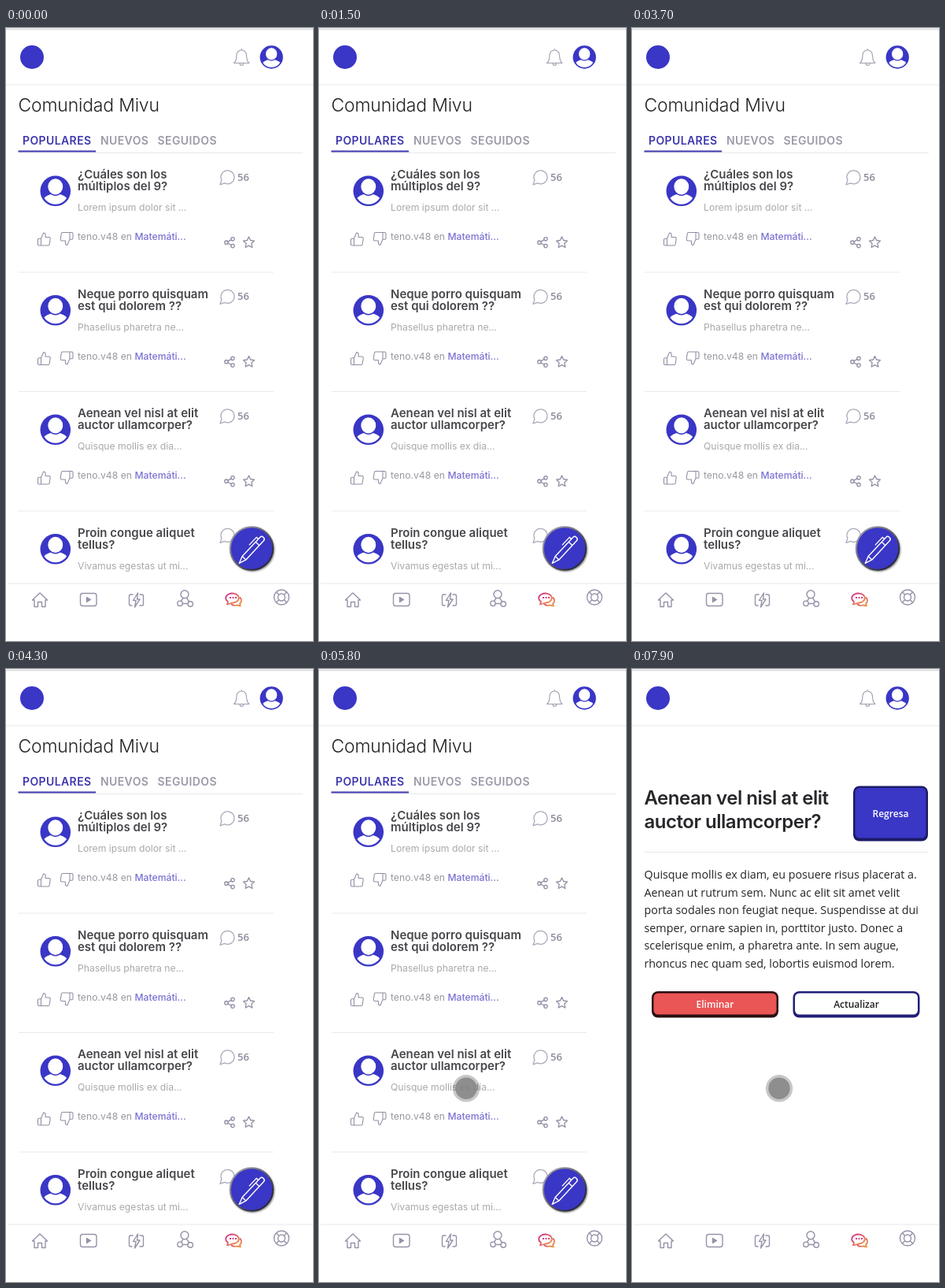
Recreate the animation shown at these times as an HTML page. Size 390 by 778 pixels, loop 8000 ms.

```html
<!DOCTYPE html>
<html lang="es">
<head>
<meta charset="utf-8">
<title>Comunidad</title>
<style>
  html, body { margin: 0; width: 100%; height: 100%; overflow: hidden; background: #fff; }
  svg.stage { display: block; width: 100vw; height: 100vh; }
  text { font-family: Inter, sans-serif; white-space: pre; }

  .heading { font-size: 23px; font-weight: 300; letter-spacing: -.2px; fill: #222; }
  .tab { font-size: 14px; font-weight: 600; letter-spacing: .4px; fill: #9b99a8; }
  .tab.active { fill: #3d37ad; }
  .question { font-size: 15px; font-weight: 600; fill: #48464b; }
  .excerpt, .meta { font-size: 12.2px; fill: #a9a9ad; }
  .meta { fill: #99979f; }
  .subject { font-weight: 500; fill: #7a72d2; }
  .count { font: 600 13px "Open Sans", sans-serif; fill: #8a8999; }
  .title { font-size: 24px; font-weight: 600; letter-spacing: -.02em; fill: #27272b; }
  .body { font: 14.3px "Open Sans", sans-serif; fill: #242428; }
  .label { font: 600 12px "Open Sans", sans-serif; text-anchor: middle; }

  .icon { fill: none; stroke: #8f8da3; stroke-width: 1.3; stroke-linecap: round; stroke-linejoin: round; }
  .icon.nav { stroke: #9593a9; stroke-width: 1.4; }
  .icon.bell { stroke: #a19fb0; stroke-width: 1.1; }
  .rule { stroke: #e9e9eb; stroke-width: 1.2; }

  #list { animation: leave 8s step-end infinite; }
  #detail { animation: enter 8s step-end infinite; }
  #touch { animation: press 8s step-end infinite; }
  @keyframes leave { 0% { visibility: visible; } 96.25%, 100% { visibility: hidden; } }
  @keyframes enter { 0% { visibility: hidden; } 96.25%, 100% { visibility: visible; } }
  @keyframes press { 0% { visibility: hidden; } 72.5%, 100% { visibility: visible; } }
</style>
</head>
<body>
<svg class="stage" viewBox="0 0 390 778">
  <defs>
    <clipPath id="face"><circle r="17"/></clipPath>
    <g id="avatar">
      <circle r="19.3" fill="#3a36c6"/>
      <g clip-path="url(#face)" fill="#fff">
        <ellipse cy="16.5" rx="17.5" ry="13"/>
        <ellipse cy="-5.4" rx="10.2" ry="10.8" stroke="#3a36c6" stroke-width="1.5"/>
      </g>
    </g>
    <path id="thumb" d="M2 -3V-7a3 3 0 0 0-3-3l-4 9v11H6.3a2 2 0 0 0 2-1.7l1.4-9a2 2 0 0 0-2-2.3zM-5 10h-3a2 2 0 0 1-2-2v-7a2 2 0 0 1 2-2h3"/>
    <path id="bubble" d="M9 -.5a8.4 8.4 0 0 1-12.3 7.6L-9 9l1.9-5.7A8.5 8.5 0 0 1 .5-9H1a8.5 8.5 0 0 1 8 8z"/>
    <g id="share">
      <circle cx="4" cy="-4.4" r="2.2"/><circle cx="-4" r="2.2"/><circle cx="4" cy="4.4" r="2.2"/>
      <path d="M-2 -1.1 2-3.3M-2 1.1 2 3.3"/>
    </g>
    <path id="star" d="M0 -7 2.1-2.5 7-1.9 3.4 1.5 4.3 6.5 0 4.1-4.3 6.5-3.4 1.5-7-1.9-2.1-2.5z"/>
    <linearGradient id="rim" x1="0" y1="0" x2="1" y2="1">
      <stop offset=".2" stop-color="#92929c"/><stop offset=".8" stop-color="#2c2c3c"/>
    </linearGradient>
    <linearGradient id="warm" x1="0" y1="0" x2="1" y2="1">
      <stop offset=".2" stop-color="#d43f80"/><stop offset="1" stop-color="#f2a33c"/>
    </linearGradient>
    <filter id="soft" x="-30%" y="-30%" width="160%" height="160%"><feGaussianBlur stdDeviation="1.2"/></filter>
  </defs>

  <rect width="390" height="778" fill="#fff"/>

  <g id="list">
    <text class="heading" x="15.5" y="106">Comunidad Mivu</text>
    <text class="tab active" x="21" y="148">POPULARES</text>
    <text class="tab" x="120" y="148">NUEVOS</text>
    <text class="tab" x="192.5" y="148">SEGUIDOS</text>
    <path class="rule" d="M16 158.5H377"/>
    <path d="M15.5 156.5H114" stroke="#3d37ad" stroke-width="2"/>
    <g id="posts"></g>
    <g transform="translate(312 660.5)">
      <circle cx="1.2" cy="1.5" r="28" fill="#000" opacity=".5" filter="url(#soft)"/>
      <circle r="27.2" fill="#3a36c6" stroke="url(#rim)" stroke-width="2"/>
      <g transform="translate(0 2) rotate(43)" fill="none" stroke="#fff" stroke-width="1.4" stroke-linejoin="round" stroke-linecap="round">
        <path d="M-3.2 -19a3.2 3 0 0 1 6.400 0V14L0 23-3.200 14zM-3.200 -11H3.200M-3.200 14H3.200M-3.200 -16H-6.500V-3"/>
      </g>
    </g>
  </g>

  <g id="detail">
    <text class="title" x="15.5" y="172">Aenean vel nisl at elit</text>
    <text class="title" x="15.5" y="202">auctor ullamcorper?</text>
    <path class="rule" d="M16 232.5H376"/>
    <g id="paragraph"></g>
    <g id="buttons"></g>
  </g>

  <path d="M0 1.5H390" stroke="#dedee0" stroke-width="2"/>
  <path class="rule" d="M0 72H390"/>
  <circle cx="33" cy="37" r="15" fill="#3a36c6"/>
  <path class="icon bell" d="M289.5 44.500C293 42 292.500 38 293 34.500a6.200 6.500 0 0 1 12.400 0C306 38 305.500 42 309 44.500zM297 45a2.300 2.300 0 0 0 4.600 0M299.200 28V26.500"/>
  <use href="#avatar" transform="translate(337.2 37) scale(.76)"/>

  <rect y="705" width="390" height="73" fill="#fff"/>
  <path class="rule" d="M2 705H390"/>
  <g class="icon nav">
    <path d="M33.5 726 43 717 52.5 726H50V734.5H45.5V728.5H40.5V734.5H36V726z"/>
    <rect x="94.5" y="717.5" width="20.5" height="16" rx="3"/>
    <path d="M102.5 722.5V728.5L107.5 725.5z" fill="#9593a9"/>
    <path d="M161 719H158.500Q156.500 719 156.500 721V731Q156.500 733 158.500 733H160M170 719H172.500Q174.500 719 174.500 721V731Q174.500 733 172.500 733H170M167.500 717 161.500 726.500H165L163.500 735 170 725H166.500z"/>
    <circle cx="227" cy="718.8" r="5"/><circle cx="221" cy="730.3" r="3.2"/><circle cx="234.200" cy="731" r="3.2"/>
    <path d="M225 723.5 222.500 727.300M229.500 723.300 232.500 728M224.300 730.500H230.800"/>
    <circle cx="350" cy="722.5" r="9.5"/><circle cx="350" cy="722.5" r="4.5"/>
    <path d="M343.500 716 346.700 719.200M356.500 716 353.300 719.200M343.500 729 346.700 725.800M356.500 729 353.300 725.800"/>
  </g>
  <g fill="none" stroke="url(#warm)" stroke-width="1.8" stroke-linejoin="round">
    <path d="M282 728A8.300 6 0 1 1 288 729.500L281 731.500z"/>
    <path d="M297 722.500C300 725 299.500 729 297 730.500L298 733.500 293.500 732.500C290 733.500 287.500 732.500 286 731"/>
    <path d="M284 723H293" stroke="#d43f80" stroke-width="2" stroke-dasharray="2 1.5"/>
  </g>

  <g id="touch" transform="translate(187 532.3)">
    <circle r="17.2" fill="#000" opacity=".22"/>
    <circle r="13.7" fill="#858585" opacity=".86"/>
  </g>
</svg>

<script>
  const put = (id, markup) => { document.getElementById(id).innerHTML = markup; };
  const icon = (name, x, y, extra = "") =>
    `<use href="#${name}" class="icon" transform="translate(${x} ${y}) ${extra}"/>`;

  const posts = [
    ["¿Cuáles son los", "múltiplos del 9?", "Lorem ipsum dolor sit ..."],
    ["Neque porro quisquam", "est qui dolorem ??", "Phasellus pharetra ne..."],
    ["Aenean vel nisl at elit", "auctor ullamcorper?", "Quisque mollis ex dia..."],
    ["Proin congue aliquet", "tellus?", "Vivamus egestas ut mi..."]
  ];

  put("posts", posts.map(([first, second, excerpt], i) => `
    <g transform="translate(0 ${i * 151.5})">
      <use href="#avatar" x="62.8" y="206.8"/>
      <text class="question" x="91" y="191">${first}</text>
      <text class="question" x="91" y="206">${second}</text>
      <text class="excerpt" x="91" y="232">${excerpt}</text>
      <text class="meta" x="91" y="269">teno.v48 en <tspan class="subject">Matemáti...</tspan></text>
      <text class="count" x="294" y="193.8">56</text>
      <g opacity=".75">${icon("bubble", 281, 189.8)}</g>
      ${icon("thumb", 48.5, 268, "scale(.8)")}
      ${icon("thumb", 77, 267.5, "rotate(180) scale(.8)")}
      ${icon("share", 284, 272.2)}
      ${icon("star", 308.5, 272)}
      <path class="rule" d="M16 310H340"/>
    </g>`).join(""));

  const lines = [
    "Quisque mollis ex diam, eu posuere risus placerat a.",
    "Aenean ut rutrum sem. Nunc ac elit sit amet velit",
    "porta sodales non feugiat neque. Suspendisse at dui",
    "semper, ornare sapien in, porttitor justo. Donec a",
    "scelerisque enim, a pharetra ante. In sem augue,",
    "rhoncus nec quam sed, lobortis euismod lorem."
  ];
  put("paragraph", lines.map((line, i) =>
    `<text class="body" x="15.5" y="${266 + i * 22.6}">${line}</text>`).join(""));

  const button = (label, x, y, w, h, fill, edge, ink) => `
    <rect x="${x}" y="${y}" width="${w}" height="${h}" rx="8" fill="${edge}"/>
    <rect x="${x + 2.5}" y="${y + 2.5}" width="${w - 5}" height="${h - 6.5}" rx="5.5" fill="${fill}"/>
    <text class="label" x="${x + w / 2}" y="${y + h / 2 + 4.3}" fill="${ink}">${label}</text>`;
  put("buttons",
    button("Regresa", 281, 148.5, 95, 70, "#3a36c6", "#1c1b66", "#fff") +
    button("Eliminar", 25, 409, 161, 33.5, "#ea5555", "#2a1012", "#fff") +
    button("Actualizar", 204.5, 409, 161, 33.5, "#fff", "#211f78", "#222"));
</script>
</body>
</html>
```
